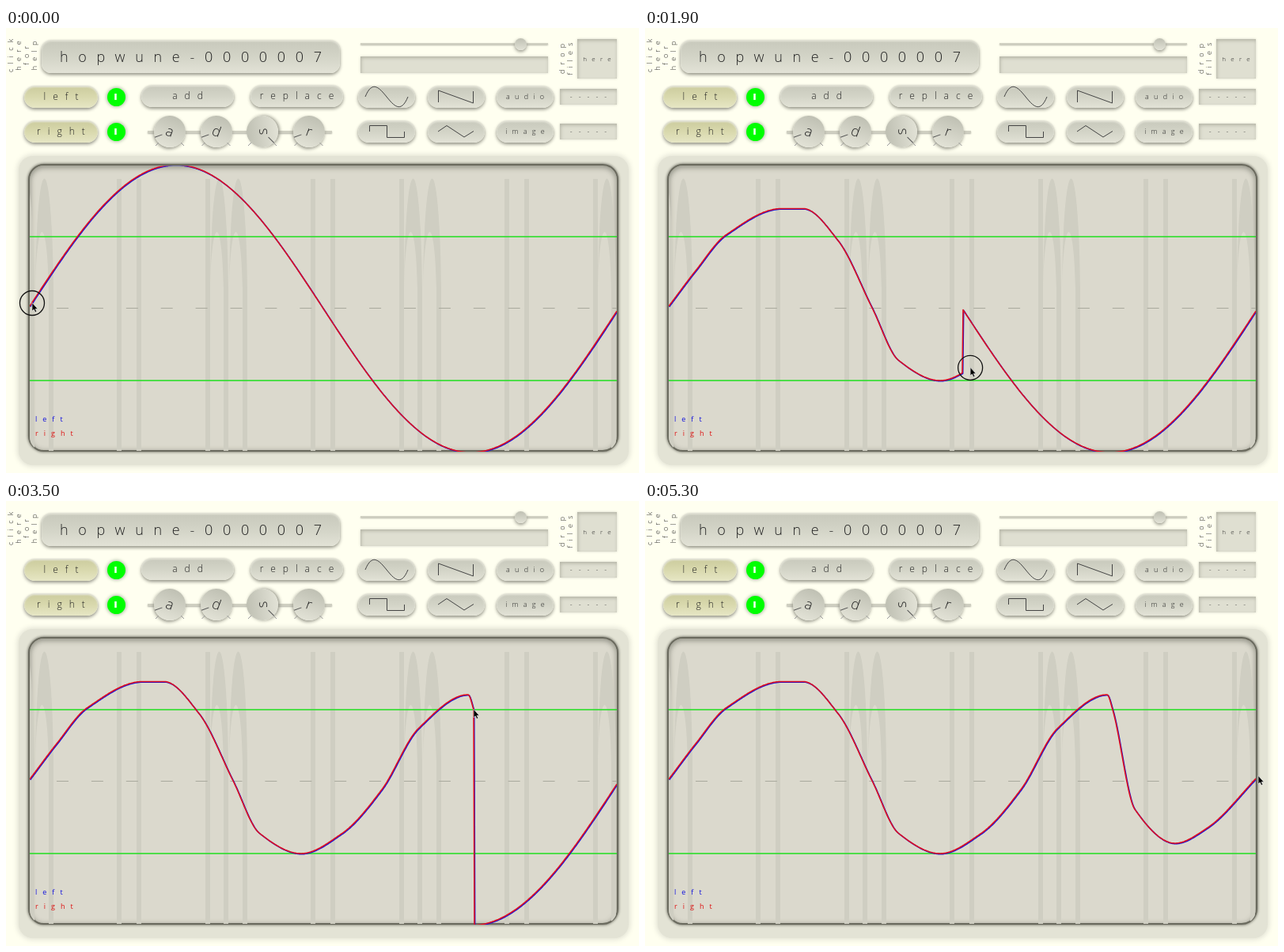
Recreate the animation shown at these times as an HTML page. Size 800x563 px, loop 5.4 s.

```html
<!DOCTYPE html>
<html lang="en">
<head>
<meta charset="utf-8">
<title>Wave drawing</title>
<style>
html, body { margin: 0; width: 100%; height: 100%; overflow: hidden; }
body { position: relative; background: #fffff0; font-family: "Open Sans", "Noto Sans", sans-serif; }
div, svg { position: absolute; box-sizing: border-box; }
svg { left: 0; top: 0; }
div { display: flex; align-items: center; justify-content: center; white-space: nowrap;
  font-weight: 300; color: #222; padding-bottom: 2px; }
.raised { background: linear-gradient(#c8c9bc, #d3d4c7 50%, #e2e2d6);
  box-shadow: 0 2px 4px #8c8c80, 0 -1px 2px #e6e6da, inset 0 1px 2px #e4e4d8; }
.warm { background: linear-gradient(#cccc9e, #d9d9ae 50%, #e6e6c4); }
.sunk { background: #dfdfd1; box-shadow: inset 1px 2px 4px #b4b4a6, 0 0 3px #d6d6c8; }
.lamp { background: #0f0; box-shadow: 0 0 4px 1px #a8b8a0; }
.knob { background: linear-gradient(#bfc0b3, #e2e2d6); box-shadow: 0 2px 4px #929286; }
.dial::after { content: ""; position: absolute; left: 20px; top: 19.5px; width: 10px; height: 1px;
  background: #555; transform-origin: left; transform: rotate(140deg) translateX(10px); }
.rail { background: #cfcfc1; box-shadow: 0 1px 2px #b4b4a8; }
.frame { background: #e3e3d5; box-shadow: 0 0 6px 2px #e3e3d5; }
.screen { background: #dbd9cd; border: 2px solid #6a6a5e;
  box-shadow: 0 0 3px 1px #8a8a7e, inset 0 2px 6px 1px #96968a; }
</style>
</head>
<body>
<svg id="stage" width="800" height="563" fill="none"></svg>
<script>
const stage = document.getElementById("stage");
const LOOP = 5400, STEP = 100;
const LEFT = 30, RIGHT = 772, MIDDLE = 355, AMPLITUDE = 182, PERIOD = 746;

// Padding balances the letter gap that trails the last glyph.
function box(kind, x, y, w, h, radius = 0, text = "", size = 9, gap = 6.3) {
  const el = document.createElement("div");
  el.className = kind;
  el.textContent = text;
  el.style.cssText = `left:${x}px;top:${y}px;width:${w}px;height:${h}px;border-radius:${radius}px;
    font-size:${size}px;letter-spacing:${gap}px;padding-left:${gap}px`;
  stage.before(el);
  return el;
}

function upright(words, x, y) {
  words.split(" ").forEach((word, i) => {
    box("", x + i * 10 - 30, y - 8, 60, 16, 0, word).style.transform = "rotate(-90deg)";
  });
}

// Monotone cubic through [x, y] points
function smooth(points) {
  const slopes = points.slice(1).map(([x, y], i) => (y - points[i][1]) / (x - points[i][0]));
  const tangents = points.map((_, i) => {
    const a = slopes[i - 1] ?? slopes[i], b = slopes[i] ?? a;
    return a * b > 0 ? 2 * a * b / (a + b) : 0;
  });
  return x => {
    let i = 0;
    while (i < points.length - 2 && x > points[i + 1][0]) i++;
    const [x0, y0] = points[i], [x1, y1] = points[i + 1];
    const w = x1 - x0, u = (x - x0) / w, v = 1 - u;
    return y0 * v * v * (1 + 2 * u) + y1 * u * u * (1 + 2 * v)
      + w * u * v * (tangents[i] * v - tangents[i + 1] * u);
  };
}

// Panels and controls
upright("click here for help", 6, 35);
upright("drop files", 703, 39);
box("raised", 45, 16, 377, 41, 12, "hopwune-0000007", 18, 12.7);
box("rail", 448, 19, 237, 2);
box("knob", 642.5, 12.5, 15, 15, 8);
box("sunk", 448, 36, 237, 21);
box("sunk", 722, 14, 50, 50, 0, "here", 8);
box("raised", 171, 73, 117, 27, 14, "add", 12, 9);
box("raised", 309, 73, 117, 27, 14, "replace", 12, 9);
[["left", "audio"], ["right", "image"]].forEach(([side, medium], row) => {
  const y = 74 + row * 44;
  box("raised warm", 23, y, 93, 27, 14, side, 12, 9);
  box("lamp", 127.5, y + 1.5, 23, 23, 12);
  for (let i = 0; i < 3; i++) box("raised", 445 + i * 87.5, y, 72, 27, 14, i == 2 ? medium : "");
  box("sunk", 700, y + 3, 72, 20, 0, "-----", 9, 8);
});
box("rail", 179, 130, 233, 3);
[..."adsr"].forEach((letter, i) => {
  const dial = box("knob dial", 187 + i * 58.5, 111, 40, 40, 20, letter, 18, 0);
  dial.style.transform = `rotate(${letter == "s" ? -95 : 20}deg)`;
});
box("frame", 16, 162, 771, 391, 18);
box("screen", 28, 172, 746, 364, 20);

// Background stripes and arches repeat across the screen
let stripes = "";
for (let x = -105; x < RIGHT; x += 245) {
  for (const dx of [0, 25, 112]) stripes += `M${x + dx} 191h6V536h-6z`;
  for (const dx of [118, 142]) {
    stripes += `M${x + dx} 330c2-186 21-186 23 0V536h-6V330c-2-96-15-96-17 0z`;
  }
}
let ticks = "";
for (let x = 207; x < 400; x += 58.5) ticks += `M${x - 14} 145l-4 4M${x + 14} 145l4 4`;

stage.innerHTML = `
  <clipPath id="view"><rect x="30" y="174.500" width="742" height="360.500" rx="17" /></clipPath>
  <clipPath id="plot"><path d="M30 174.500H772V536H30z" /></clipPath>
  <defs><path id="wave" stroke-width="1.600" stroke-linejoin="round" /></defs>
  <path clip-path="url(#view)" d="${stripes}" fill="#cfcec2" />
  <g clip-path="url(#plot)">
    <path d="M64 354.500H772" stroke="#a9a99d" stroke-dasharray="15 28.9" />
    <path d="M30 264H772M30 446H772" stroke="#20e020" stroke-width="1.500" />
    <use href="#wave" x=".7" y=".7" stroke="#11d" />
    <use href="#wave" stroke="#e01020" />
  </g>
  <g font-size="9" letter-spacing="7">
    <text x="37" y="498" fill="#11d">left</text>
    <text x="37" y="516" fill="#d11">right</text>
  </g>
  <path d="M138.500 83v8M138.500 127v8" stroke="#fff" stroke-width="2.500" />
  <path d="${ticks}" stroke="#999" />
  <path stroke="#444" d="M454 87C472 43 490 131 508 87
    M546.500 94V79L590.500 95V80
    M459.500 131V123.500H481.500V138.500H503.500V131
    M546 131L557 123.500L579 138L591 130.500" />
  <g id="cursor">
    <circle id="ring" r="15.500" stroke="#111" stroke-width="1.300" />
    <path d="M0 -.5v10.500l2.300-2 1.600 3.600 1.800-.8-1.600-3.400h3z"
      fill="#000" stroke="#eee" stroke-width=".6" />
  </g>`;

// Bends of the hand-drawn curve
const drawn = smooth([
  [30, 352], [64, 307], [102, 262], [172, 228.5], [200, 228.5], [244, 269], [287, 354],
  [320, 420], [373, 446], [424, 421], [475, 365], [521, 288], [584, 245], [591, 264],
  [619, 390], [670, 433], [710, 414], [776, 347],
]);
// Time, pointer and ink; the ink trails the pointer
const moments = [
  [0, 33, 30], [500, 73, 64], [1300, 249, 244], [2400, 513, 503],
  [3500, 591, 591], [4300, 632, 619], [5300, 775, 772],
];
const pointerX = smooth(moments.map(([t, pointer]) => [t, pointer]));
const inkX = smooth(moments.map(([t, , ink]) => [t, ink]));
const sine = x => MIDDLE - AMPLITUDE * Math.sin(2 * Math.PI * (x - LEFT + 2) / PERIOD);

const wave = document.getElementById("wave");
const cursor = document.getElementById("cursor");
const ring = document.getElementById("ring");

function draw() {
  const t = Math.floor(performance.now() % LOOP / STEP) * STEP;
  const ink = inkX(t);
  const points = [];
  for (let x = LEFT; x <= RIGHT; x++) {
    points.push(`${x} ${(x <= ink + 0.01 ? drawn(x) : sine(x)).toFixed(1)}`);
  }
  wave.setAttribute("d", "M" + points.join("L"));
  const x = pointerX(t);
  cursor.setAttribute("transform", `translate(${x} ${drawn(x)})`);
  const released = t >= 3400 && t < 3700 || t >= 5200;
  ring.setAttribute("visibility", released ? "hidden" : "visible");
  requestAnimationFrame(draw);
}
draw();
</script>
</body>
</html>
```
